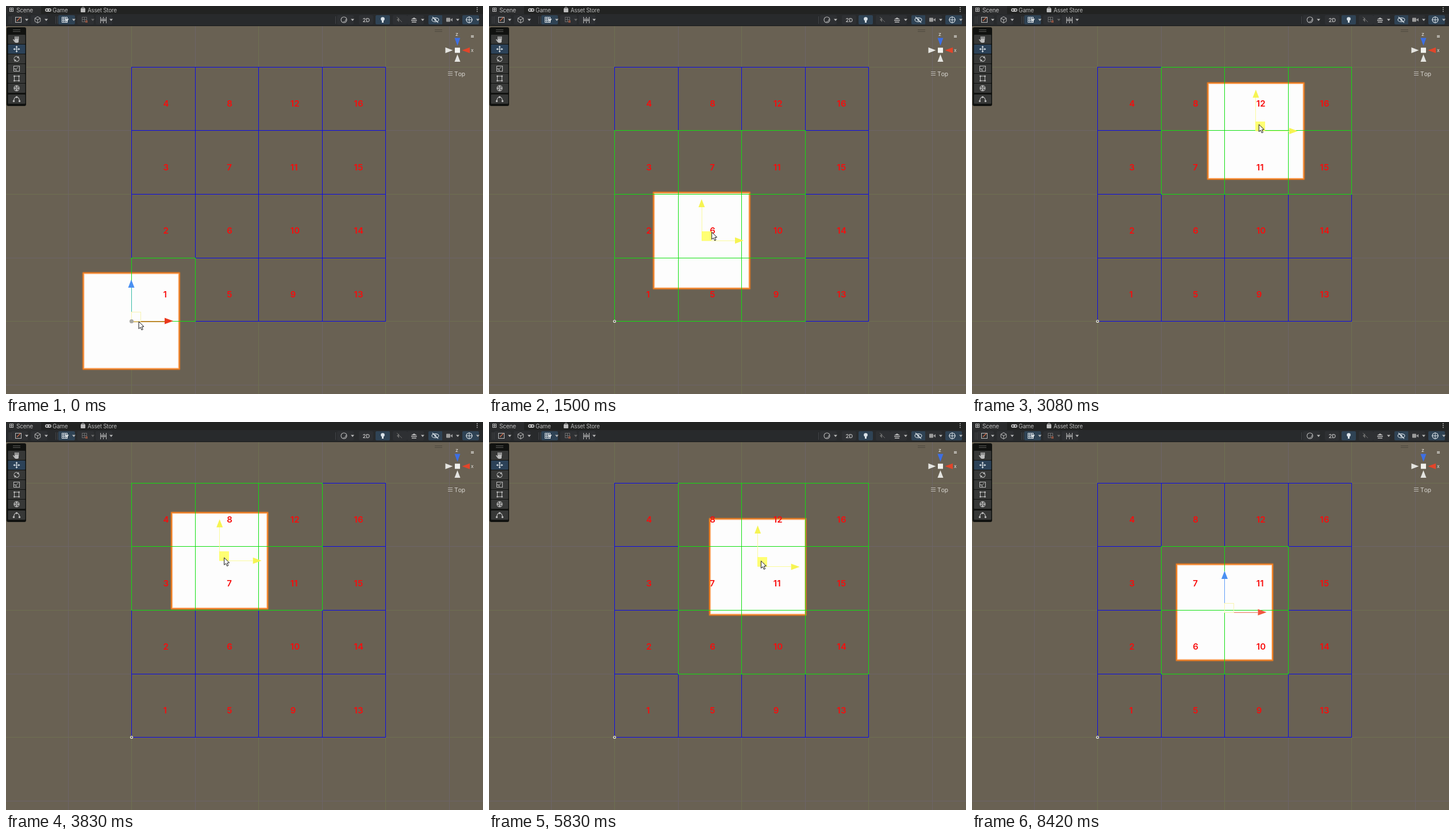
Animation, 830 px wide and 675 px high, one loop 8.91 s. Source, as an HTML page with a canvas:

```html
<!DOCTYPE html>
<html lang="en">
<head>
<meta charset="utf-8">
<title>Grid overlap</title>
<style>
html, body { margin: 0; width: 100%; height: 100%; overflow: hidden; background: #696153; }
canvas { display: block; }
</style>
</head>
<body>
<canvas id="stage" width="830" height="675"></canvas>
<script>
const ctx = document.getElementById('stage').getContext('2d');
const LOOP = 8910, FPS = 12, LAST = 101, HALF = 83.5;
const PRESS = 415, RELEASE = 7750;
const LIGHT = '#bcbcbc', DIM = '#6c6c6c', BRIGHT = '#dae2e8';

// grid line positions; rows count upwards
const gx = i => Math.floor(218.5 + 110.5 * i);
const gy = i => Math.floor(548.65 - 110.6 * i);

// turning points of the drag: time, x, y
const PATH = [
  [580, 218, 548], [1500, 370, 408], [2420, 519.5, 330], [3000, 504, 222],
  [3830, 372, 241], [4250, 386, 333], [4830, 492.5, 429], [5330, 522, 308],
  [5830, 468, 252], [6420, 390, 290], [7000, 435, 336], [7670, 439.5, 331]
];

function rect(x, y, w, h, fill) {
  ctx.fillStyle = fill;
  ctx.fillRect(x, y, w, h);
}
function round(x, y, w, h, r, fill) {
  ctx.fillStyle = fill;
  ctx.beginPath();
  ctx.roundRect(x, y, w, h, r);
  ctx.fill();
}
function box(x, y, w, h, color, width = 1) {
  ctx.strokeStyle = color;
  ctx.lineWidth = width;
  ctx.strokeRect(x, y, w, h);
}
function disc(x, y, r, fill) {
  ctx.beginPath();
  ctx.arc(x, y, r, 0, 2 * Math.PI);
  ctx.fillStyle = fill;
  ctx.fill();
}
function ring(x, y, r, color, from = 0, to = 2 * Math.PI, ry = r) {
  ctx.beginPath();
  ctx.ellipse(x, y, r, ry, 0, from, to);
  ctx.strokeStyle = color;
  ctx.lineWidth = 1.1;
  ctx.stroke();
}
function line(x1, y1, x2, y2, color, width = 1) {
  ctx.beginPath();
  ctx.moveTo(x1, y1);
  ctx.lineTo(x2, y2);
  ctx.strokeStyle = color;
  ctx.lineWidth = width;
  ctx.stroke();
}
// triangle with its tip at x, y, pointing along dx, dy
function tip(x, y, dx, dy, length, half, fill) {
  const bx = x - dx * length, by = y - dy * length;
  ctx.beginPath();
  ctx.moveTo(x, y);
  ctx.lineTo(bx - dy * half, by + dx * half);
  ctx.lineTo(bx + dy * half, by - dx * half);
  ctx.fillStyle = fill;
  ctx.fill();
}
function text(s, x, y, size, fill, weight = 400, spacing = -.2) {
  ctx.font = `${weight} ${size}px Inter, Roboto, sans-serif`;
  ctx.letterSpacing = spacing + 'px';
  ctx.fillStyle = fill;
  ctx.fillText(s, x, y);
}

function spline(a, b, c, d, i, u) {
  const h = c[0] - b[0];
  const m1 = (c[i] - a[i]) / (c[0] - a[0]) * h;
  const m2 = (d[i] - b[i]) / (d[0] - b[0]) * h;
  const v = 1 - u;
  return v * v * (1 + 2 * u) * b[i] + u * u * (3 - 2 * u) * c[i] + u * v * (v * m1 - u * m2);
}
function centre(t) {
  const last = PATH.length - 1;
  t = Math.max(PATH[0][0], Math.min(PATH[last][0], t));
  const k = Math.max(1, PATH.findIndex(p => p[0] >= t));
  const b = PATH[k - 1], c = PATH[k];
  const a = PATH[k - 2] || b, d = PATH[k + 1] || c;
  const u = (t - b[0]) / (c[0] - b[0]);
  return [1, 2].map(i => spline(a, b, c, d, i, u));
}

function ground() {
  rect(0, 35, 830, 640, '#696153');
  for (let k = -1; k <= 5; k++) {
    const color = k % 2 ? '#6c6468' : '#6f7052';
    rect(gx(k), 35, 1, 640, color);
    if (k < 5) rect(0, gy(k), 830, 1, color);
  }
}

function square(x, y) {
  rect(x - HALF, y - HALF, 2 * HALF, 2 * HALF, '#fdfdfd');
  ctx.lineJoin = 'round';
  box(x - HALF, y - HALF, 2 * HALF, 2 * HALF, 'rgba(244,124,28,.3)', 4.5);
  box(x - HALF, y - HALF, 2 * HALF, 2 * HALF, '#f47e1e', 2);
}

function cell(c, r, color) {
  box(gx(c) + .5, gy(r + 1) + .5, gx(c + 1) - gx(c), gy(r) - gy(r + 1), color);
}
function grid(x, y) {
  const touched = (c, r) => x - HALF < gx(c + 1) && x + HALF > gx(c)
    && y - HALF < gy(r) && y + HALF > gy(r + 1);
  ctx.lineJoin = 'miter';
  for (const on of [false, true])
    for (let n = 0; n < 16; n++) {
      const c = n >> 2, r = n % 4;
      if (touched(c, r) === on) cell(c, r, on ? '#10e010' : '#0c0ce8');
    }
  for (let n = 0; n < 16; n++)
    text(n + 1, 273.6 + 110.55 * (n >> 2), 507 - 110.55 * (n % 4), 15, '#f80c0c', 600, .3);
}

function handles(x, y, mode) {
  const drag = mode === 'drag', pale = '#fbfb9c', yellow = '#f6f452';
  const px = Math.floor(x), py = Math.floor(y);
  rect(px, py - 58, 1, 58, drag ? pale : mode === 'free' ? '#5f9cf8' : '#35bba6');
  rect(px, py, 58, mode === 'axis' ? 2 : 1, drag ? pale : mode === 'axis' ? '#bd8a2c' : '#f2705c');
  if (drag || mode === 'plane') rect(px, py - 16, 17, 16, 'rgba(255,255,96,.88)');
  else box(px + .5, py - 15.5, 16, 16, '#f8f4b0');
  tip(x, y - 72, 0, -1, 14, 5.5, drag ? yellow : '#4a90f2');
  tip(x + 73, y, 1, 0, 15, 5.5, drag ? yellow : mode === 'free' ? '#f2573f' : '#ea381c');
}

function origin(start) {
  disc(218.5, 548.5, start ? 3.6 : 2.6, start ? '#a9a9a4' : '#e4e4dc');
  if (!start) disc(218.5, 548.5, 1.2, '#45453e');
}

function pointer(x, y) {
  ctx.save();
  ctx.translate(x, y);
  ctx.lineJoin = 'miter';
  ctx.fillStyle = '#fff';
  ctx.strokeStyle = '#151515';
  ctx.lineWidth = 1;
  const shape = new Path2D('M0 0V12.5L3 10L5 14.6L7.2 13.6L5.2 9.1L9 8.8Z');
  ctx.fill(shape);
  ctx.stroke(shape);
  ctx.restore();
}

function arrows(x, y, r, color) {
  line(x - r, y, x + r, y, color);
  line(x, y - r, x, y + r, color);
  for (const s of [-1, 1]) {
    tip(x + s * (r + 1), y, s, 0, 3, 2, color);
    tip(x, y + s * (r + 1), 0, s, 3, 2, color);
  }
}
function mesh(x, y, size, parts, color) {
  for (let i = 0; i <= parts; i++) {
    const k = i * size / parts;
    rect(x + k, y, 1, size + 1, color);
    rect(x, y + k, size + 1, 1, color);
  }
}
function grip(x, y, color) {
  rect(x, y, 13, 1, color);
  rect(x, y + 3, 13, 1, color);
}

function tabs() {
  rect(0, 0, 830, 14, '#222322');
  rect(0, 0, 61, 14, '#2b2c2d');
  mesh(6, 3, 6, 2, LIGHT);
  text('Scene', 18, 10.5, 10.1, LIGHT);
  round(68, 4, 11, 6, 3, LIGHT);
  disc(71, 7, 1.2, '#222');
  disc(76, 7, 1.2, '#222');
  text('Game', 81, 10.5, 9.9, LIGHT);
  round(130, 4, 8, 7, 1, LIGHT);
  ring(134, 4, 2, LIGHT, Math.PI);
  text('Asset Store', 142, 10.5, 9.7, LIGHT);
  for (let i = 0; i < 3; i++) rect(819, 2 + i * 3.3, 1.6, 1.6, LIGHT);
}

// one toolbar button; wide ones carry a drop-down caret
function button(x, wide, on, icon, dim) {
  round(x - 12, 16, wide ? 29 : 25, 16, 2, on ? '#2f4355' : '#2e3033');
  if (wide) tip(x + 15, 26, 0, 1, 3.5, 3, dim ? DIM : LIGHT);
  icon(x, 24);
}

function toolbar() {
  rect(0, 14, 830, 21, '#282a2c');
  rect(0, 34, 830, 1, '#1b1c1d');
  for (const x of [5, 86, 573]) {
    rect(x, 18, 1, 13, '#414346');
    rect(x + 3, 18, 1, 13, '#414346');
  }
  button(21, true, false, (x, y) => {
    box(x - 4.5, y - 4.5, 10, 9, LIGHT);
    line(x - 2, y + 2, x + 4, y - 4, '#d4704c', 1.2);
  });
  button(55, true, false, (x, y) => {
    ctx.beginPath();
    for (let a = 0; a < 6; a++)
      ctx.lineTo(x + 5.5 * Math.sin(a * Math.PI / 3), y - 5.5 * Math.cos(a * Math.PI / 3));
    ctx.closePath();
    ctx.strokeStyle = LIGHT;
    ctx.lineWidth = 1;
    ctx.stroke();
    for (const a of [-1, 0, 1]) line(x, y, x + a * 4.8, a ? y - 2.8 : y + 5.5, LIGHT);
  });
  button(103, true, true, (x, y) => {
    mesh(x - 6, y - 5, 9, 3, BRIGHT);
    text('Y', x, y + 5, 9, '#fff', 600);
  });
  button(136, true, false, (x, y) => {
    mesh(x - 4, y - 5, 8, 2, DIM);
    rect(x + 2, y + 1, 4, 4, '#8a5140');
  }, true);
  button(168, true, false, (x, y) => {
    rect(x - 4, y, 11, 1, LIGHT);
    for (let i = 0; i < 5; i++) rect(x - 4 + i * 2.5, y - (i % 2 ? 3 : 5), 1, i % 2 ? 6 : 11, LIGHT);
  });
  button(588, true, false, (x, y) => {
    ring(x, y, 5, LIGHT);
    ring(x - 1, y - 1, 4.5, LIGHT, 0, 1.6);
  });
  button(626, false, false, (x, y) => text('2D', x - 5.5, y + 3.5, 9.5, LIGHT, 600));
  button(655, false, true, (x, y) => {
    disc(x + .5, y - 1.5, 3.3, BRIGHT);
    rect(x - 1, y + 1, 3, 4, BRIGHT);
  });
  button(685, false, false, (x, y) => {
    tip(x - 5, y, -1, 0, 4, 4, DIM);
    line(x - 5, y - 5, x + 4, y + 4, DIM);
  });
  button(710, true, false, (x, y) => {
    tip(x, y - 4, 0, -1, 3, 5, LIGHT);
    line(x - 5, y + 1, x + 5, y + 1, LIGHT, 1.5);
    line(x - 4, y + 4, x + 4, y + 4, LIGHT, 1.5);
  });
  button(747, false, true, (x, y) => {
    ring(x, y, 6, BRIGHT, 0, 2 * Math.PI, 3.4);
    disc(x, y, 1.7, BRIGHT);
    line(x - 5, y - 5, x + 5, y + 5, BRIGHT, 1.2);
  });
  button(771, true, false, (x, y) => {
    round(x - 5, y - 3.5, 7, 7, 1, '#9c9c9c');
    tip(x + 2, y, -1, 0, 4, 3, '#9c9c9c');
  });
  button(806, true, true, (x, y) => {
    ring(x, y, 5, BRIGHT);
    line(x - 6, y, x + 6, y, BRIGHT);
    line(x, y - 6, x, y + 6, BRIGHT);
  });
}

function tools() {
  const x = 18.5;
  const icons = [
    y => {
      round(x - 3.5, y - 1, 7, 7, 2.5, LIGHT);
      for (let i = -2; i < 2; i++) rect(x + i * 2 + .5, y - 5, 1.3, 6, LIGHT);
      line(x - 3, y + 4, x - 6, y, LIGHT, 1.5);
    },
    y => arrows(x, y, 5, BRIGHT),
    y => {
      ring(x, y, 4.5, LIGHT, -.6, 1.9);
      ring(x, y, 4.5, LIGHT, 2.5, 5);
      tip(x + 4, y - 5, .6, -.8, 4, 2, LIGHT);
      tip(x - 4, y + 5, -.6, .8, 4, 2, LIGHT);
    },
    y => {
      box(x - 5, y - 4.5, 10, 9, LIGHT);
      box(x - 5, y + .5, 4, 4, LIGHT);
      line(x, y, x + 3, y - 3, LIGHT);
    },
    y => {
      box(x - 4, y - 4, 8, 8, LIGHT);
      for (const sx of [-4, 4]) for (const sy of [-4, 4]) rect(x + sx - 1.2, y + sy - 1.2, 2.5, 2.5, LIGHT);
    },
    y => { ring(x, y, 4.6, LIGHT); arrows(x, y, 4, LIGHT); },
    y => {
      ring(x, y + 4, 5, LIGHT, Math.PI, 2 * Math.PI, 8);
      for (const k of [-1, 0, 1]) disc(x + 5 * k, y + (k ? 3.5 : -3.5), 1.7, LIGHT);
    }
  ];
  round(1, 37, 34, 137, 3, '#111210');
  grip(12, 41, '#5b5b58');
  icons.forEach((icon, i) => {
    const y = 58 + i * 17 + (i === 6 ? 2 : 0);
    round(3.5, y - 8, 30, 16, 1, i === 1 ? '#2c4258' : '#373837');
    icon(y);
  });
}

function compass() {
  const x = 785.5, y = 77, pale = '#e4e4e0';
  grip(746, 41, '#4e493f');
  tip(x, y - 8, 0, 1, 13.5, 5, '#3d6fe4');
  tip(x + 8, y, -1, 0, 13.5, 5, '#e2452a');
  tip(x - 8, y, 1, 0, 13, 5, pale);
  tip(x, y + 7, 0, -1, 13, 5, pale);
  rect(781, 72.5, 9, 9, '#f2f2ee');
  text('z', 782, 52, 9, pale);
  text('x', 809, 80, 8.5, pale);
  rect(809, 51, 5, 1, pale);
  rect(809, 53, 5, 1.5, pale);
  for (let i = 0; i < 3; i++) rect(769, 114 + 3 * i, 8, 1, '#bdbab2');
  text('Top', 780, 121.5, 10.3, '#d8d6d0', 400, 0);
}

function cursorAt(t) {
  if (t < PRESS) {
    const u = Math.min(1, t / 250);
    return [231 - 2 * u, 549 - 11 * u];
  }
  // the mouse runs slightly ahead of the square, then leaves
  const [x, y] = centre(t + 40);
  const away = Math.max(0, (t - RELEASE) / 583) ** 1.6;
  return [x + 11 + 309 * away, y - 10 + 328 * away];
}

function modeAt(t) {
  if (t < 160) return 'axis';
  if (t < PRESS) return 'plane';
  return t < RELEASE ? 'drag' : 'free';
}

function draw(t) {
  const [x, y] = centre(t);
  ground();
  square(x, y);
  grid(x, y);
  handles(x, y, modeAt(t));
  origin(t < PATH[0][0]);
  tabs();
  toolbar();
  tools();
  compass();
  if (t < 8400) pointer(...cursorAt(t));
}

// the picture advances twelve times a second
let shown = -1;
function tick() {
  const t = performance.now() % LOOP;
  const step = Math.min(LAST, Math.floor((t + 5) * FPS / 1000));
  if (step !== shown) {
    shown = step;
    draw(step * 1000 / FPS);
  }
  requestAnimationFrame(tick);
}
ctx.fontKerning = 'none';
tick();
</script>
</body>
</html>
```
